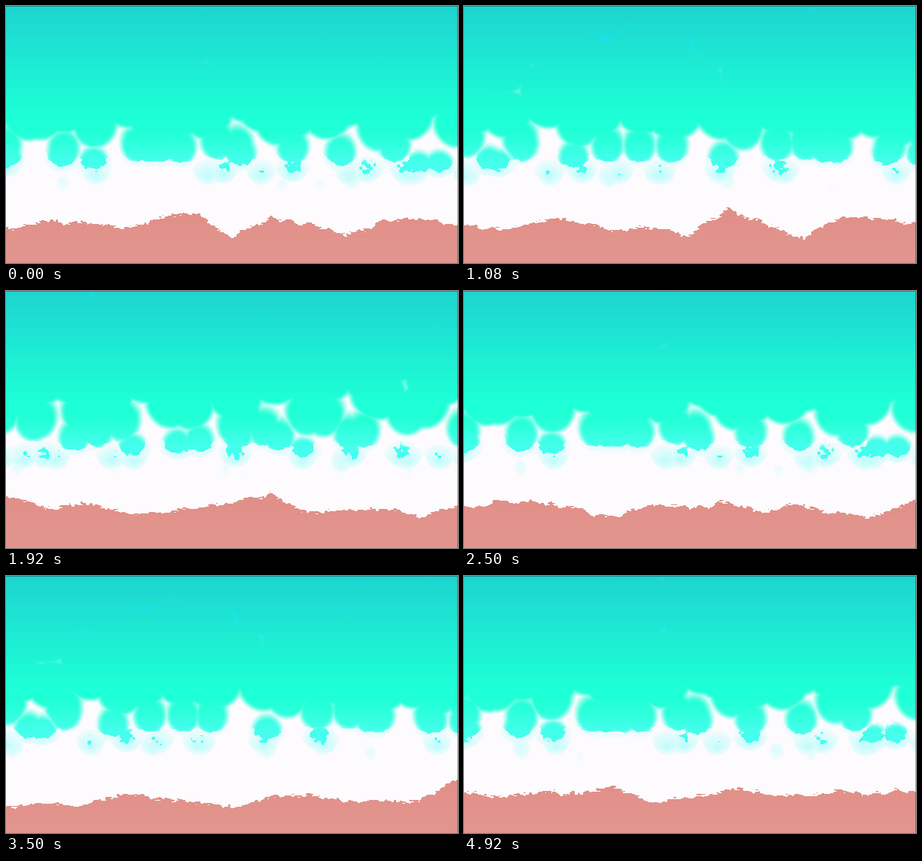
Animation, 600 px wide and 342 px high, one loop 5 s. Source, as an HTML page with a canvas:

```html
<!DOCTYPE html>
<html lang="en">
<head>
<meta charset="utf-8">
<title>Shoreline</title>
<style>
  html, body { margin: 0; width: 100%; height: 100%; overflow: hidden; }
  canvas { display: block; }
</style>
</head>
<body>
<canvas id="sea" width="600" height="342"></canvas>
<script>
const W = 600, H = 342, LOOP = 5000, STEPS = 60;
const CELL = 38, COLS = 18, ROWS = 9, STRIDE = COLS + 1;
const ctx = document.getElementById('sea').getContext('2d');
const image = ctx.createImageData(W, H);
const pixels = image.data.fill(255);
const px = new Float32Array(STRIDE * (ROWS + 1)), py = new Float32Array(px.length);

// Step of the loop, then the height of the waterline every 50 px
const SHORE = [
  [0, 299,288,287,292,285,274,308,280,290,305,287,281,293],
  [13, 290,298,285,286,297,294,304,270,288,309,279,284,289],
  [23, 274,290,283,293,296,288,283,269,295,293,287,298,285],
  [30, 289,280,279,291,300,286,290,281,292,284,298,299,275],
  [42, 306,302,307,289,294,300,306,293,290,299,300,298,269],
  [50, 293,308,301,294,289,288,304,297,294,306,299,285,271],
  [59, 290,293,288,291,281,300,294,283,289,294,285,289,284]
];

const mix = (a, b, k) => a + (b - a) * k;
const clamp = v => Math.max(0, Math.min(1, v));
const smooth = (a, b, v) => { const k = clamp((v - a) / (b - a)); return k * k * (3 - 2 * k); };

function hash(x, y) {
  let h = Math.imul(x, 374761393) + Math.imul(y, 668265263);
  h = Math.imul(h ^ (h >>> 13), 1274126177);
  return ((h ^ (h >>> 16)) >>> 0) / 4294967296;
}

function noise(x, y) {
  const i = Math.floor(x), j = Math.floor(y), u = smooth(0, 1, x - i), v = smooth(0, 1, y - j);
  return mix(mix(hash(i, j), hash(i + 1, j), u), mix(hash(i, j + 1), hash(i + 1, j + 1), u), v);
}

function moveCells(step) {
  const turn = step / STEPS * 4 * Math.PI;
  for (let j = 0; j <= ROWS; j++) for (let i = 0; i <= COLS; i++) {
    const n = j * STRIDE + i;
    px[n] = i - 0.5 + 0.5 * Math.sin(turn + 6.283 * hash(i, j + 40));
    py[n] = j - 0.5 + 0.5 * Math.sin(turn + 6.283 * hash(i + 70, j));
  }
}

// Distance to the nearest cell centre, in cells
function distance(x, y) {
  const u = x / CELL, v = y / CELL, ci = Math.floor(u) + 1, cj = Math.floor(v) + 1;
  let best = 9;
  for (let j = Math.max(0, cj - 1); j <= Math.min(ROWS, cj + 1); j++)
    for (let i = Math.max(0, ci - 1); i <= Math.min(COLS, ci + 1); i++) {
      const n = j * STRIDE + i, dx = px[n] - u, dy = py[n] - v;
      best = Math.min(best, dx * dx + dy * dy);
    }
  return Math.sqrt(best);
}

function shoreline(step) {
  let n = 0;
  while (n < SHORE.length - 2 && step >= SHORE[n + 1][0]) n++;
  const [t0, ...a] = SHORE[n], [t1, ...b] = SHORE[n + 1], k = smooth(t0, t1, step);
  return Float32Array.from({ length: W }, (_, x) => {
    const i = Math.floor(x / 50), f = x / 50 - i;
    const ripple = 7 * (noise(x / 13, step / 5) - 0.5);
    return mix(mix(a[i], a[i + 1], f), mix(b[i], b[i + 1], f), k) + ripple;
  });
}

function draw(step) {
  const shore = shoreline(step);
  moveCells(step);
  for (let y = 0; y < H; y++) {
    const depth = Math.min(1, y / 145), band = smooth(120, 200, y);
    const threshold = 0.92 - 0.55 * band - Math.max(0, y - 215) / 60;
    const width = 0.35 - 0.05 * band;
    const veil = 0.18 * smooth(155, 215, y), fade = 0.7 + 0.3 * smooth(222, 252, y);
    const red = 29, green = 212 + 43 * depth, blue = 208 + 6 * depth + 30 * smooth(165, 240, y);
    const foamRed = mix(25, 253, smooth(60, 125, y)), foamGreen = mix(226, 251, smooth(20, 125, y));
    for (let x = 0; x < W; x++) {
      let r = 253, g = 251, b = 253;
      if (y < 252) {
        const d = distance(x, y);
        let foam = mix(veil, 1, smooth(threshold, threshold + width, d));
        if (y > 185 && y + 70 * d * d + 10 * noise(x / 5, y / 4) > 226)
          foam = Math.max(foam, Math.min(1, fade + 0.4 * d));
        r = mix(red, foamRed, foam);
        g = mix(green, foamGreen, foam);
        b = mix(blue, 254, foam);
      } else if (y > 262 && y + 6 * (noise(x / 4, y / 2 + step * 7) - 0.5) > shore[x]) {
        r = 225;
        g = 143 + (y - 270) * 0.09;
        b = 136 + (y - 270) * 0.09;
      }
      const shade = y === 0 || x === W - 1 ? 0.7 : 1, p = (y * W + x) * 4;
      pixels[p] = r * shade;
      pixels[p + 1] = g * shade;
      pixels[p + 2] = b * shade;
    }
  }
  ctx.putImageData(image, 0, 0);
}

let shown = -1;
function tick() {
  const step = Math.floor((performance.now() + 4) * STEPS / LOOP) % STEPS;
  if (step !== shown) draw(shown = step);
  requestAnimationFrame(tick);
}
tick();
</script>
</body>
</html>
```
